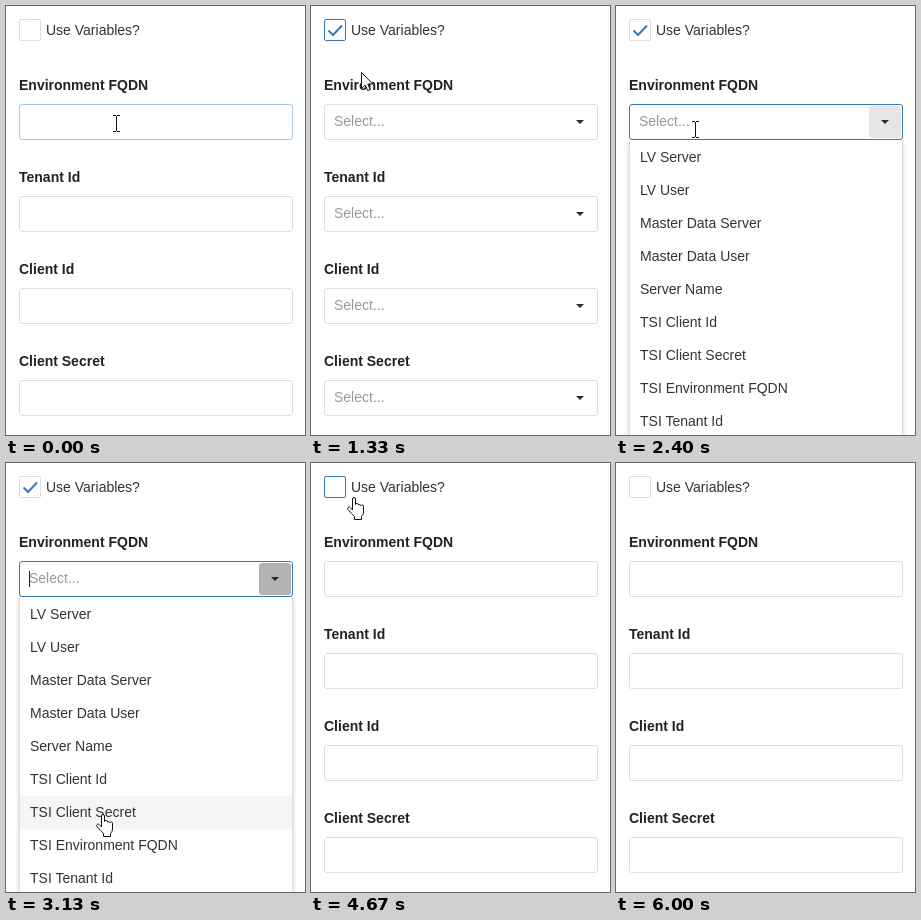
Animation of 299x429 px, one loop 6.07 s. Source, as an HTML page:

```html
<!DOCTYPE html>
<html lang="en">
<head>
<meta charset="utf-8">
<title>Variable form</title>
<style>
  html, body { margin: 0; width: 100%; height: 100%; overflow: hidden; background: #fff; }
  body { position: relative; font: 14px/20px "Liberation Sans", Arial, sans-serif; color: #333; cursor: default; }
  body * { position: absolute; box-sizing: border-box; white-space: nowrap; }
  .box, .field { border: 1px solid #ddd; border-radius: 3px; background: #fff; }
  .box { left: 13px; top: 13px; width: 22px; height: 22px; border-radius: 2px; }
  .box.on { border-color: #337ab7; }
  .tick { left: 0; top: 0; }
  .name { left: 13px; font-weight: bold; color: #222; }
  .field { left: 13px; width: 274px; height: 36px; }
  .field.hover { border-color: #a6c8e2; }
  .field.focus { border-color: #337ab7; }
  .hint { left: 9px; top: 6px; color: #999; }
  .button { right: 1px; top: 1px; width: 32px; height: 32px; border-radius: 3px; }
  .arrow { right: 13px; top: 15px; border: 4px solid transparent; border-top-color: #1f2d3d; border-bottom: 0; }
  .caret { left: 9px; top: 9px; width: 1px; height: 16px; background: #222; }
  .menu { left: 13px; top: 134px; width: 274px; height: 320px; background: #fff;
          border: 1px solid #ddd; border-top: 0; box-shadow: 0 3px 5px rgba(0,0,0,.18); }
  .item { left: 0; width: 272px; height: 33px; padding-left: 10px; line-height: 33px; }
  .item.hover { background: #f5f5f5; }
  .cursor { left: 0; top: 0; overflow: visible; }
</style>
</head>
<body>
<script>
const LOOP = 6070, TICK = 1000 / 15;
const CHECK = 14, FOCUS = 28, OPEN = 29, CLOSE = 65, UNCHECK = 70, BLUR = 90, BLINK = 8;
const names = ['Environment FQDN', 'Tenant Id', 'Client Id', 'Client Secret'];
const options = ['LV Server', 'LV User', 'Master Data Server', 'Master Data User', 'Server Name',
  'TSI Client Id', 'TSI Client Secret', 'TSI Environment FQDN', 'TSI Tenant Id'];

// Pointer waypoints: tick, x, y
const path = [
  [0, 110, 117], [2, 103, 106], [6, 62, 48], [9, 42, 24], [19, 42, 24],
  [20, 50, 66], [23, 68, 108], [26, 79, 123], [40, 79, 123],
  [42, 81, 155], [45, 92, 298], [47, 97, 351], [49, 99, 379], [51, 99, 379],
  [53, 95, 335], [57, 57, 85], [59, 43, 34], [80, 43, 34],
  [81, 47, 39], [83, 60, 110], [87, 90, 432], [91, 90, 432]
];

const shapes = {
  arrow: '<path d="M.5.5V16.5L4.2 13 6.7 18.6 9.2 17.5 6.8 12H11.8Z" fill="#fff" stroke="#111"/>',
  hand: '<path transform="translate(-7)" d="M5.5 13V2a1.5 1.5 0 0 1 3 0V7.5a1.5 1.3 0 0 1 3 .5 ' +
    '1.5 1.3 0 0 1 2.5.8 1.3 1.3 0 0 1 2.5 1V15q0 2.5-2 4.5V22.5H7.5V19.5Q5 17 1 12.5' +
    'a1.5 1.5 0 0 1 2.4-1.8Z" fill="#fff" stroke="#111" stroke-linejoin="round"/>',
  beam: '<path d="M-3-7.5H0M1-7.5H4M.5-7V8M-3 8.5H0M1 8.5H4" fill="none" stroke="#111"/>'
};

function add(parent, cls, top, text = '') {
  const el = document.createElement('div');
  el.className = cls;
  if (top !== undefined) el.style.top = top + 'px';
  el.textContent = text;
  parent.append(el);
  return el;
}
const show = (el, on) => { el.style.display = on ? '' : 'none'; };

const body = document.body;
const box = add(body, 'box');
box.innerHTML = '<svg class="tick" width="20" height="20"><path d="M3.5 10.5 8 15 17 5.5" ' +
  'fill="none" stroke="#337ab7" stroke-width="2"/></svg>';
add(body, 'label', 14, 'Use Variables?').style.left = '40px';

const fields = names.map((name, i) => {
  add(body, 'name', 69 + 92 * i, name);
  const el = add(body, 'field', 98 + 92 * i);
  const button = add(el, 'button');
  const parts = [add(el, 'hint', undefined, 'Select...'), add(el, 'arrow')];
  return { el, button, parts };
});
const caret = add(fields[0].el, 'caret');
const menu = add(body, 'menu');
const items = options.map((text, i) => add(menu, 'item', 1 + 33 * i, text));

const cursors = {};
for (const kind in shapes) {
  body.insertAdjacentHTML('beforeend', `<svg class="cursor" width="1" height="1">${shapes[kind]}</svg>`);
  cursors[kind] = body.lastElementChild;
}

function pointer(k) {
  const i = path.findIndex(p => p[0] > k);
  const [a, x, y] = path[i - 1], [b, u, v] = path[i];
  const f = (k - a) / (b - a);
  return [Math.round(x + (u - x) * f), Math.round(y + (v - y) * f)];
}

function draw(t) {
  const k = Math.min(90, Math.floor((t + 4) / TICK));
  const within = (from, to) => k >= from && k < to;
  const [x, y] = pointer(k);
  const checked = within(CHECK, UNCHECK), focus = within(FOCUS, CLOSE), open = within(OPEN, CLOSE);
  const onLabel = y > 12 && y < 36 && x < 136;
  const row = open && y >= 135 ? Math.floor((y - 135) / 33) : -1;
  const over = row < 0 ? names.findIndex((_, i) => y >= 98 + 92 * i && y < 134 + 92 * i) : -1;

  box.classList.toggle('on', onLabel || within(CHECK, FOCUS) || within(CLOSE, BLUR));
  show(box.firstChild, checked);
  fields.forEach(({ el, button, parts }, i) => {
    const active = focus && i === 0;
    el.classList.toggle('hover', i === over);
    el.classList.toggle('focus', active);
    parts.forEach(p => show(p, checked));
    show(button, active);
    button.style.background = i === over ? '#e6e6e6' : '#b3b3b3';
  });
  show(caret, focus && Math.floor((k - FOCUS) / BLINK) % 2 === 0);
  show(menu, open);
  items.forEach((el, i) => el.classList.toggle('hover', i === row));

  const kind = onLabel || row >= 0 ? 'hand' : over >= 0 ? 'beam' : 'arrow';
  for (const name in cursors) show(cursors[name], name === kind && k < 87);
  cursors[kind].style.transform = `translate(${x}px, ${y}px)`;
}

function frame() {
  draw(performance.now() % LOOP);
  requestAnimationFrame(frame);
}
frame();
</script>
</body>
</html>
```
